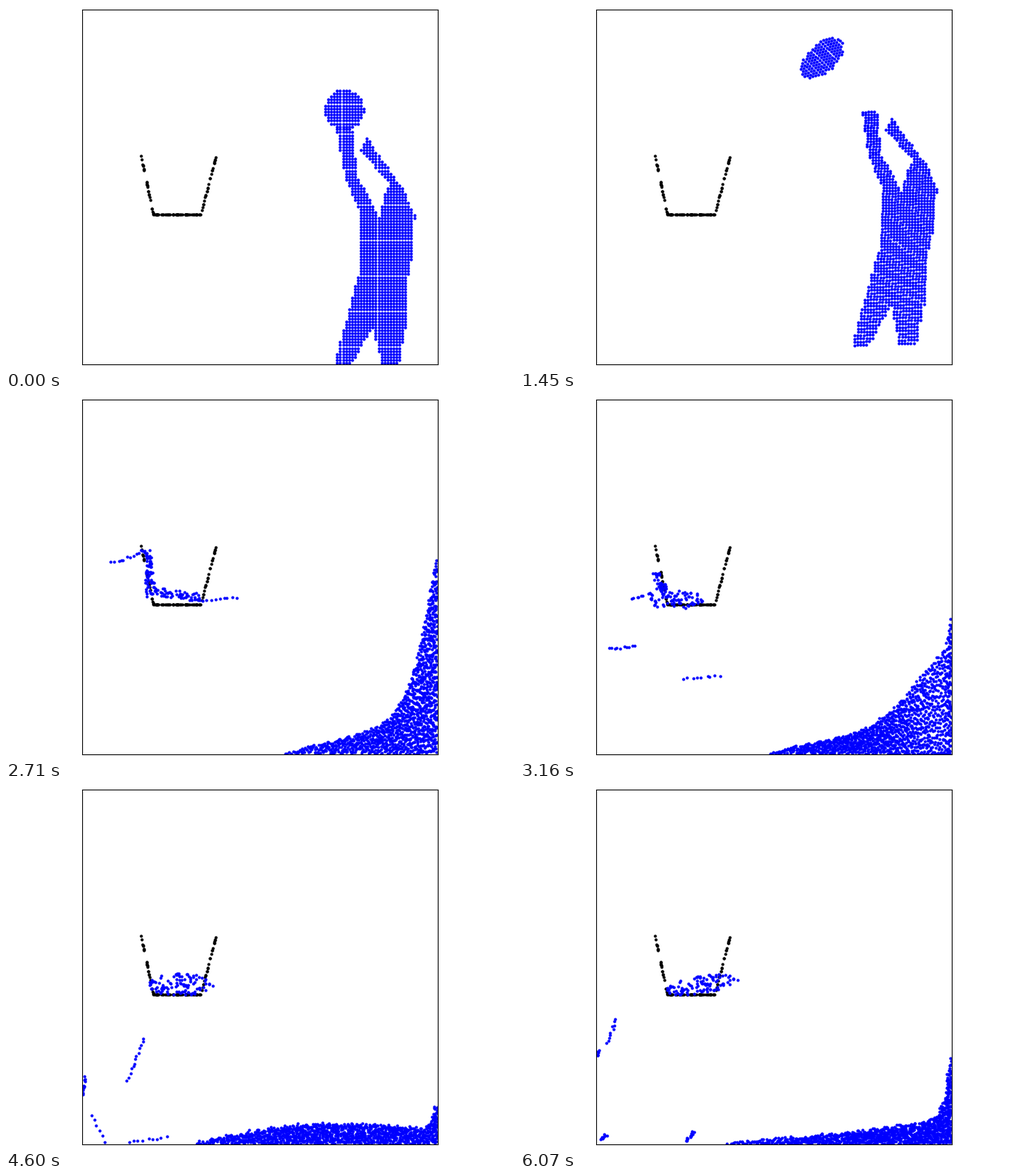
A matplotlib script that plays this animation: 700x500 px, repeating every 6100 ms.

```python
import numpy as np
import matplotlib.pyplot as plt
from matplotlib.animation import FuncAnimation

W, H, DPI = 700, 500, 100
LEFT, RIGHT, TOP, FLOOR = 105, 595, 5, 495
CELL = 490 / 120
LOOP, TICK, HOLD, STEP = 6100, 10, 1120, 30
# Steps at which a pose is defined
JUMP, LEAN, DROP, HIT, SLOSH, SETTLE, REST = 12, 30, 42, 54, 86, 117, 166

rng = np.random.default_rng(4)


def line(x0, y0, x1, y1, t):
    return np.c_[x0 + (x1 - x0) * t, y0 + (y1 - y0) * t]


def noise(n, size):
    return rng.normal(0, size, (n, 2))


def track(keys, poses, free):
    """Hermite path through poses; after `free` of them motion is damped."""
    keys, poses = np.array(keys, float), np.array(poses)
    vel = np.gradient(poses, keys, axis=0, edge_order=2)
    vel[free:] *= 0.35

    def at(k):
        i = min(np.searchsorted(keys, k, "right") - 1, len(keys) - 2)
        h = keys[i + 1] - keys[i]
        u = (k - keys[i]) / h
        a, b = u * u * (3 - 2 * u), u * (1 - u)
        return (poses[i] * (1 - a) + poses[i + 1] * a
                + h * b * ((1 - u) * vel[i] - u * vel[i + 1]))
    return at


# ---------- starting shapes on a regular grid ----------
gx, gy = np.meshgrid(LEFT + 0.17 + CELL * np.arange(120),
                     FLOOR - CELL * (np.arange(120) + 0.5))
grid = np.c_[gx.ravel(), gy.ravel()]


def slab(y0, l0, r0, y1, l1, r1):
    """Grid mask of a trapezoid between two levels."""
    x, y = grid.T
    t = (y - y0) / (y1 - y0)
    return ((t >= 0) & (t < 1)
            & (x > l0 + (l1 - l0) * t) & (x < r0 + (r1 - r0) * t))


centre = np.array([466, 142.5])
in_ball = np.hypot(*(grid - centre).T) < 27.4
in_body = ~in_ball & np.any([
    slab(168, 455, 476, 235, 466, 484),     # left forearm
    slab(235, 466, 484, 290, 489, 514),     # left upper arm
    slab(181, 496, 500, 198, 490, 508),     # right hand
    slab(198, 488, 508, 250, 531, 545),     # right forearm
    slab(250, 524, 546, 290, 514, 564),     # shoulder
    slab(290, 488, 563, 374, 489, 557),     # torso
    slab(374, 484, 553, 438, 467, 553),     # shorts
    slab(438, 466, 508, 495, 453, 475),     # left leg
    slab(438, 503, 552, 495, 518, 541),     # right leg
], axis=0)
ball, body = grid[in_ball], grid[in_body]

# ---------- player: jump, lean on the wall, collapse ----------
a, h = (body[:, 0] - 508) / 55, (body[:, 1] - 335) / 160
jump = body + np.c_[10 - 5.5 * h, -35 + 9 * h**2 - 2 * a]
lean = body + np.c_[
    26 - 26 * h + 7 * h**2 - 7 * h**3 + 14 * a * np.maximum(h, 0)**3,
    3 + (1 - h**2) * (25 * h - 22 * a - 11)]

# Whoever stands further right and higher ends up nearer the wall
order = np.argsort(lean[:, 0] - 0.2 * lean[:, 1])
level = np.empty(len(body))
for col in np.array_split(order, 40):
    up = np.argsort(np.argsort(-lean[col, 1]))
    level[col] = (up + rng.random(len(col))) / len(col)


def heap(start, lift, power, hump, wall, width, mess):
    """Fill the area under a sloping surface that climbs the right wall."""
    x = np.linspace(start, RIGHT - 1, 600)
    t = (x - start) / (RIGHT - start)
    top = (2 + lift * t**power + hump * np.sin(np.pi * t)
           + wall * np.exp(-((RIGHT - x) / width)**1.3))
    area = np.cumsum(top) / top.sum()
    n = len(body)
    px = np.empty(n)
    px[order] = np.interp((np.arange(n) + 0.5) / n, area, x)
    py = FLOOR - 1 - level * np.interp(px, x, top)
    return np.c_[px, py] + noise(n, mess)


player = track(
    [0, JUMP, LEAN, HIT, SLOSH, SETTLE, REST],
    [body, jump, lean,
     heap(383, 52, 1, 0, 225, 30, 0.5),
     heap(297, 22, 1, 18, 80, 9, 0.8),
     heap(262, 16, 1, 17, 46, 8, 1.2),
     heap(288, 34, 2, 4, 95, 9, 1.6)], free=3)

# ---------- ball: stretch in flight, splash into the basket ----------
ball = ball[np.argsort(ball[:, 0] - ball[:, 1])]


def flown(k):
    mid = centre + [-3.97 * k - 0.0167 * k**2, -8.35 * k + 0.203 * k**2]
    shear = -0.025 * k
    stretch = np.array([[1 + 0.55 * (k / 30)**3, shear],
                        [shear, 1.02 - 0.45 * (k / 42)**6]])
    return mid + (ball - centre) @ stretch


# Drops that miss: count, then the line they form at each later pose
left = 10, [(145, 231, 184, 217), (106, 484, 133, 491),
            (106, 425, 109, 402), (121, 355, 132, 322)]
drip = 6, [(186, 212, 198, 222), (121, 359, 141, 340),
           (116, 455, 137, 492), (106, 373, 108, 366)]
leak = 13, [(194, 240, 193, 276), (166, 302, 188, 289),
            (167, 407, 191, 349), (228, 490, 240, 478)]
right = 9, [(272, 283, 317, 278), (178, 493, 225, 490),
            (170, 492, 221, 485), (111, 488, 118, 482)]

kept = len(ball) - sum(s[0] for s in (left, drip, leak, right))
ang, rad = rng.random(kept) * 2 * np.pi, np.sqrt(rng.random(kept))
disc = np.c_[rad * np.cos(ang), rad * np.sin(ang)]
disc = disc[np.argsort(disc[:, 0])]


def pool(x, y, rx, ry, tilt):
    """Tilted oval of the drops held by the basket."""
    return np.c_[x + rx * disc[:, 0], y + ry * disc[:, 1] + tilt * disc[:, 0]]


down = np.linspace(0, 1, kept)
along_wall = np.c_[np.interp(down, [0, 0.45, 1], [196, 202, 268]),
                   np.interp(down, [0, 0.45, 1], [215, 270, 278])]
held = [along_wall + 6 * disc[rng.permutation(kept)],
        pool(214, 263, 30, 25, -8),
        pool(240, 274, 46, 15, 0),
        pool(250, 274, 51, 12, -8)]


def splash(i):
    strays = [line(*ends[i], np.linspace(0, 1, n)) + noise(n, 1)
              for n, ends in (left, drip, leak, right)]
    return np.concatenate([*strays[:3], held[i], strays[3]])


shot = track([0, JUMP, LEAN, DROP, HIT, SLOSH, SETTLE, REST],
             [flown(k) for k in (0, JUMP, LEAN, DROP)]
             + [splash(i) for i in range(4)], free=4)

# ---------- basket: dots strewn along three sides ----------
basket = np.concatenate([
    line(186, 207.5, 203, 287.8, rng.random(24)),
    line(203, 287.8, 268, 287.8, rng.random(48)),
    line(268, 287.8, 289, 209, rng.random(24)),
    [(186, 207.5), (203, 287.8), (268, 287.8), (289, 209)]])

# ---------- stage ----------
fig = plt.figure(figsize=(W / DPI, H / DPI), dpi=DPI, facecolor="white")
ax = fig.add_axes([LEFT / W, 1 - FLOOR / H, (RIGHT - LEFT) / W,
                   (FLOOR - TOP) / H])
ax.set(xlim=(LEFT, RIGHT), ylim=(FLOOR, TOP), xticks=[], yticks=[])
dot = dict(ls="none", marker="o", ms=3, mew=0)
ax.plot(*basket.T, color="black", **dot)
dots, = ax.plot(*np.concatenate([ball, body]).T, color="blue", **dot)


def update(i):
    t = i * TICK
    k = 0 if t < HOLD else 1 + (t - HOLD) // STEP
    p = np.concatenate([shot(k), player(k)])
    dots.set_data(np.clip(p[:, 0], LEFT + 1, RIGHT - 1),
                  np.clip(p[:, 1], TOP + 1, FLOOR - 1))
    return dots,


anim = FuncAnimation(fig, update, frames=LOOP // TICK, interval=TICK,
                     repeat=True, repeat_delay=0, blit=False)
plt.show()
```
